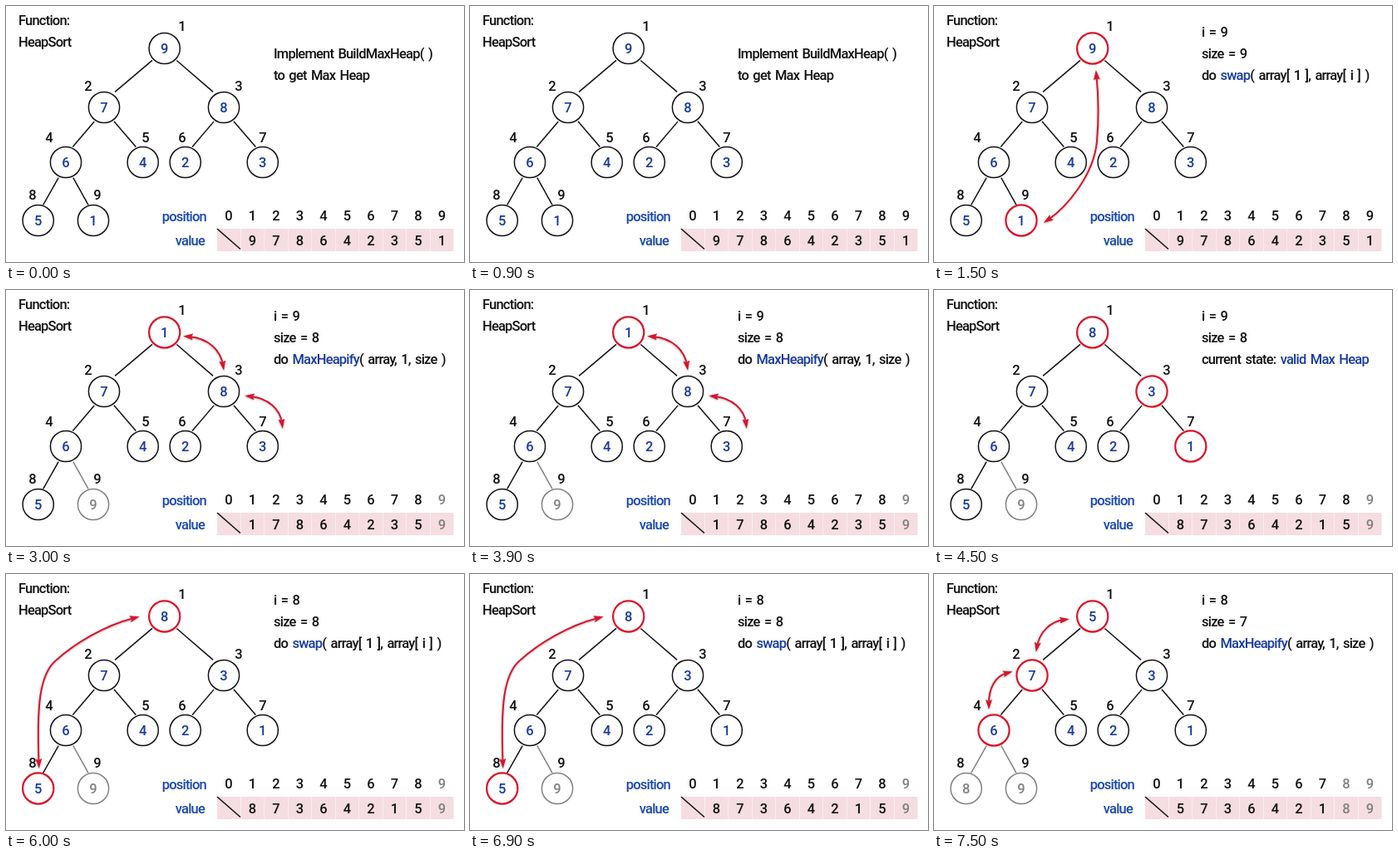
Recreate the animation shown at these times as an HTML page. Size 551 by 308 pixels, loop 8000 ms.

```html
<!DOCTYPE html>
<html lang="en">
<head>
<meta charset="utf-8">
<title>Heap sort</title>
<style>
  html, body { margin: 0; width: 100%; height: 100%; overflow: hidden; background: #fff; }
  svg { display: block; width: 100vw; height: 100vh; }
  text {
    font: 500 16.5px Roboto, "Liberation Sans", sans-serif;
    letter-spacing: -.8px; word-spacing: 2px; fill: #111; white-space: pre;
  }
  .num { letter-spacing: 0; text-anchor: middle; }
  .blue { fill: #17399f; }
  .head { fill: #1747ad; text-anchor: end; }
  .gray { fill: #808080; }
  .arrow {
    fill: none; stroke: #d9142a; stroke-width: 2;
    marker-start: url(#tip); marker-end: url(#tip);
    filter: drop-shadow(0 1px 1px #0004);
  }
</style>
</head>
<body>
<svg id="stage" viewBox="0 0 551 308">
  <defs>
    <marker id="tip" markerUnits="userSpaceOnUse" markerWidth="12" markerHeight="8"
            refX="5" refY="4" orient="auto-start-reverse">
      <path d="M0 0L12 4L0 8L2 4Z" fill="#d9142a"/>
    </marker>
  </defs>
  <rect width="551" height="308" fill="#fff"/>
  <text x="15" y="23">Function:</text>
  <text x="15" y="49">HeapSort</text>
  <text class="head" x="241" y="259">position</text>
  <text class="head" x="239" y="288">value</text>
</svg>
<script>
const svg = document.getElementById('stage');
const LOOP = 8000, STEP = 1500, R = 18.6;

// Node centre, then label centre.
const nodes = [
  [190.7, 51, 212, 24], [118, 122, 99, 96], [262, 122, 280, 96],
  [72, 188, 52, 158], [164.7, 188, 168, 158], [215.7, 188, 212, 158],
  [308.8, 188, 309, 158], [38.7, 258, 32, 227], [105, 258, 110, 227]
];

// Text between asterisks is blue.
const steps = [
  { heap: '978642351', size: 9, red: [], top: 63,
    lines: ['Implement BuildMaxHeap( )', 'to get Max Heap'], arrows: [] },
  { heap: '978642351', size: 9, red: [1, 9],
    lines: ['i = 9', 'size = 9', 'do *swap*( array[ 1 ], array[ i ] )'],
    arrows: ['M195.5 84C198 110 198 140 196 163C192 205 158 243 137.5 257'] },
  { heap: '178642359', size: 8, red: [1],
    lines: ['i = 9', 'size = 8', 'do *MaxHeapify*( array, 1, size )'],
    arrows: ['M220 56C243 58 258 72 261 90', 'M294 128C316 130 330 144 332 160'] },
  { heap: '873642159', size: 8, red: [1, 3, 7],
    lines: ['i = 9', 'size = 8', 'current state: *valid Max Heap*'], arrows: [] },
  { heap: '873642159', size: 8, red: [1, 8],
    lines: ['i = 8', 'size = 8', 'do *swap*( array[ 1 ], array[ i ] )'],
    arrows: ['M154 53C118 62 82 84 60 104C40 121 37 160 39.5 227'] },
  { heap: '573642189', size: 7, red: [1, 2, 4],
    lines: ['i = 8', 'size = 7', 'do *MaxHeapify*( array, 1, size )'],
    arrows: ['M156 55C140 57 127 70 124 87', 'M88 119C73 123 66 138 66 156'] }
];

function add(parent, tag, attrs, text) {
  const el = document.createElementNS('http://www.w3.org/2000/svg', tag);
  for (const key in attrs) el.setAttribute(key, attrs[key]);
  if (text !== undefined) el.textContent = text;
  parent.appendChild(el);
  return el;
}

const number = (x, y, text, cls = '') =>
  add(svg, 'text', { x, y: y + 6, class: 'num ' + cls }, text);

const cellX = i => 268 + i * 28.5;
const edges = [], rings = [], keys = [], positions = [], values = [];

for (let i = 0; i < 10; i++) {
  add(svg, 'rect', { x: cellX(i) - 14, y: 268, width: 28, height: 27, fill: '#f5dde2' });
  positions.push(number(cellX(i), 252, i));
  values.push(number(cellX(i), 282, ''));
}
add(svg, 'path', { d: 'M254 268L282 292.5', stroke: '#111', 'stroke-width': 1.6 });

// An edge leaves the parent towards the child's centre and lands just above the child.
function edge([px, py], [x, y]) {
  const k = (R + 2) / Math.hypot(x - px, y - py);
  return add(svg, 'line', {
    x1: px + (x - px) * k, y1: py + (y - py) * k,
    x2: x + (px - x) * .18, y2: y - R, 'stroke-width': 1.5
  });
}

nodes.forEach((node, i) => {
  const [x, y, lx, ly] = node;
  if (i) edges[i] = edge(nodes[(i - 1) >> 1], node);
  rings.push(add(svg, 'circle', { cx: x, cy: y, r: R, fill: '#fff' }));
  keys.push(number(x, y, ''));
  number(lx, ly, i + 1);
});

const notes = add(svg, 'g', {});

function writeLine(line, y) {
  const row = add(notes, 'text', { x: 322, y });
  line.split('*').forEach((part, i) => add(row, 'tspan', i % 2 ? { class: 'blue' } : {}, part));
}

function show({ heap, size, red, lines, arrows, top = 37 }) {
  nodes.forEach((_, i) => {
    const n = i + 1, out = n > size, hot = red.includes(n);
    const ink = out ? '#808080' : '#111';
    if (i) edges[i].setAttribute('stroke', ink);
    rings[i].setAttribute('stroke', hot ? '#d9142a' : ink);
    rings[i].setAttribute('stroke-width', hot ? 2.2 : 1.5);
    keys[i].textContent = values[n].textContent = heap[i];
    keys[i].setAttribute('class', 'num ' + (out ? 'gray' : 'blue'));
    for (const el of [positions[n], values[n]]) el.setAttribute('class', out ? 'num gray' : 'num');
  });
  notes.replaceChildren();
  lines.forEach((line, i) => writeLine(line, top + i * 26));
  arrows.forEach(d => add(notes, 'path', { d, class: 'arrow' }));
}

let current = -1;
const start = performance.now();

function draw(now) {
  const t = Math.max(0, now - start) % LOOP;
  const step = Math.floor(t / STEP);
  if (step !== current) show(steps[current = step]);
  requestAnimationFrame(draw);
}
draw(start);
</script>
</body>
</html>
```
